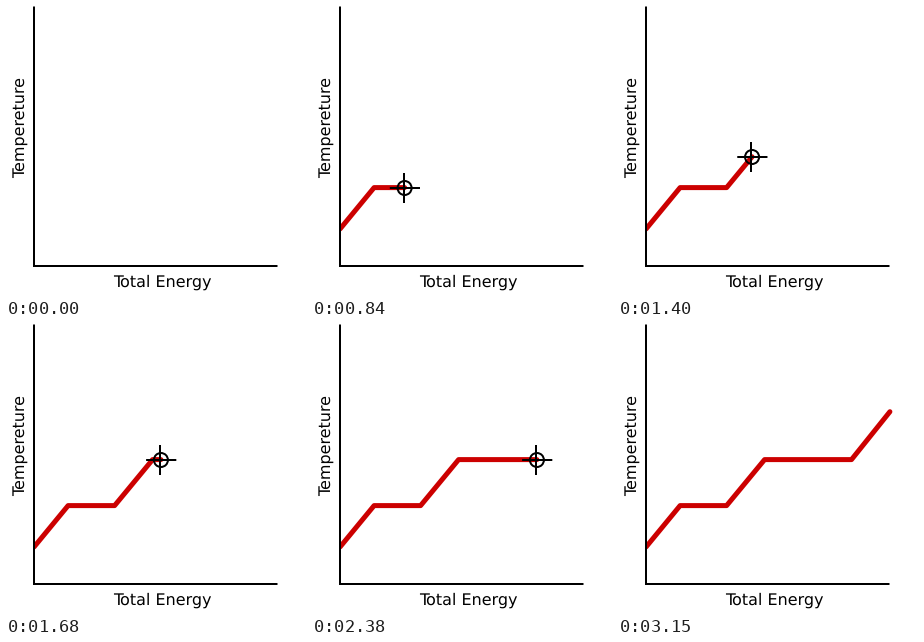
A matplotlib script for the animation above (3220 ms loop, 300x290 px).

```python
import math

import numpy as np
import matplotlib.pyplot as plt
from matplotlib.animation import FuncAnimation
from matplotlib.patches import Circle, Rectangle

W, H, DPI = 300, 290, 100
FRAMES, STEP_MS = 46, 70
PX = 72 / DPI  # points per pixel

plt.rcParams["text.hinting"] = "none"
fig = plt.figure(figsize=(W / DPI, H / DPI), dpi=DPI, facecolor="white")
ax = fig.add_axes([0, 0, 1, 1])
ax.set_xlim(0, W)
ax.set_ylim(H, 0)
ax.axis("off")


def stroke(xs, ys, width=2, color="black", **kw):
    return ax.plot(xs, ys, color=color, lw=width * PX, **kw)[0]


def label(x, y, text, angle=0):
    ax.text(x, y, text, rotation=angle, rotation_mode="anchor",
            ha="left", va="baseline", family="DejaVu Sans", size=16 * PX)


# Heating curve: slopes joined by two plateaus
path = np.array([(28.1, 222.9), (62.1, 181.6), (108.6, 181.6),
                 (146.6, 135.6), (233.5, 135.6), (271.9, 87.7)])
dist = np.concatenate([[0], np.cumsum(np.hypot(*np.diff(path, axis=0).T))])

stroke([28, 28, 271.5], [0.5, 260, 260], zorder=3, snap=False,
       solid_capstyle="butt", solid_joinstyle="miter")
label(107, 281, "Total Energy")
label(20, 172.5, "Tempereture", 90)

curve = stroke([], [], 5, "#cc0000", zorder=2, snap=False,
               solid_capstyle="round", solid_joinstyle="round")
plot_area = Rectangle((28, 0), W, H, transform=ax.transData)
curve.set_clip_path(plot_area)

bar_h = stroke([], [], zorder=4, snap=False, solid_capstyle="butt")
bar_v = stroke([], [], zorder=4, snap=False, solid_capstyle="butt")
ring = ax.add_patch(Circle((0, 0), 7, fill=False, ec="black",
                           lw=2 * PX, zorder=4))
cursor = (bar_h, bar_v, ring)


def draw(i):
    s = dist[-1] * min(i / (FRAMES - 2), 1)
    x, y = (np.interp(s, dist, path[:, k]) for k in (0, 1))
    trail = np.vstack([path[dist < s], [(x, y)]]) if i else np.empty((0, 2))
    curve.set_data(trail[:, 0], trail[:, 1])

    # The bars keep to whole pixels across their width
    cx, cy = math.floor(x - 0.1), math.floor(y + 0.4)
    bar_h.set_data([x - 14.8, x + 15.4], [cy, cy])
    bar_v.set_data([cx, cx], [cy - 15, cy + 15])
    ring.center = (x, cy)
    for part in cursor:
        part.set_visible(0 < i < FRAMES - 1)
    return (curve, *cursor)


anim = FuncAnimation(fig, draw, frames=FRAMES, interval=STEP_MS,
                     init_func=lambda: draw(0), repeat=True, repeat_delay=0)
plt.show()
```
